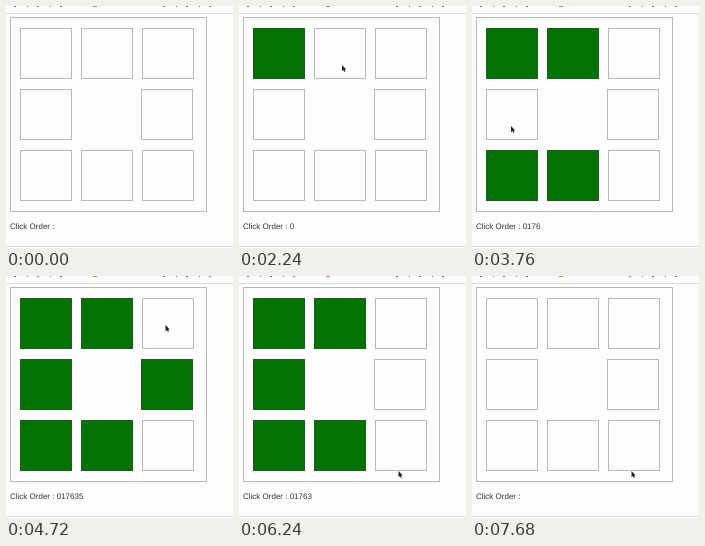
Write an HTML page that moves like this. It is 227 by 242 pixels and loops after 8000 ms.

```html
<!DOCTYPE html>
<html lang="en">
<head>
<meta charset="utf-8">
<title>Click order</title>
<style>
  html, body { margin: 0; height: 100%; overflow: hidden; background: #fdfdfd; }
  svg { display: block; width: 100vw; height: 100vh; }
  text { font: 8px "Liberation Sans", Arial, sans-serif; fill: #333; white-space: pre; text-rendering: geometricPrecision; }
  .box { fill: #fdfdfd; stroke: #b8b8b8; }
  .on { fill: #007300; stroke: #1f5c1f; }
</style>
</head>
<body>
<svg viewBox="0 0 227 242">
  <!-- bottom edge of the cropped line of text above -->
  <path d="M8 .5H60M157 .5H206" stroke="#777" stroke-dasharray="2 11 1 9"/>
  <path d="M87 .5h4" stroke="#e0708a"/>
  <path d="M0 7.5H227M0 240.5H227" stroke="#ddd"/>
  <rect class="box" x="4.5" y="11.5" width="196" height="194"/>
  <g id="grid"></g>
  <text id="label" x="4" y="223.4"></text>
  <path id="cursor" d="M0 0V6.2L1.4 5L2.4 7.1L3.4 6.6L2.5 4.6H4.3Z" fill="#222" stroke="#fff" stroke-width=".6" paint-order="stroke"/>
</svg>
<script>
const LOOP = 8000, STEP = 80;
const $ = id => document.getElementById(id);
const snap = t => Math.round(t / STEP) * STEP;

// cells in click order, and where the pointer rests for each click
const order = [..."01763528"];
const stops = [[42, 54], [103, 59], [101, 168], [40, 170], [39, 120], [160, 108], [159.5, 49], [159.5, 195]];

// clicks come evenly; then the last clicked cell clears first
const clickAt = i => snap(1970 + 480 * i);
const clearAt = i => snap(5600 + 300 * (order.length - 1 - i));

// start, duration, target
const entry = [205, 236];
const moves = [
  [880, 560, [75, 127]],
  ...stops.map((stop, i) => [i ? clickAt(i - 1) : 1600, 240, stop])
];

const boxes = order.map(cell => {
  const r = document.createElementNS("http://www.w3.org/2000/svg", "rect");
  const x = 14.5 + 61 * (cell % 3) - (cell === "5"), y = 22.5 + 61 * Math.floor(cell / 3);
  const attrs = { x, y, width: 51, height: 50 };
  for (const name in attrs) r.setAttribute(name, attrs[name]);
  return $("grid").appendChild(r);
});

const ease = p => p * p * (3 - 2 * p);

function pointer(t) {
  let [x, y] = entry;
  for (const [from, span, [tx, ty]] of moves) {
    const p = ease(Math.min(1, Math.max(0, (t - from) / span)));
    x += (tx - x) * p;
    y += (ty - y) * p;
  }
  return [x, y];
}

function draw() {
  const t = Math.floor((performance.now() - begin) % LOOP / STEP) * STEP;
  const lit = order.map((_, i) => t >= clickAt(i) && t < clearAt(i));
  boxes.forEach((box, i) => box.setAttribute("class", lit[i] ? "box on" : "box"));
  $("label").textContent = "Click Order : " + order.filter((_, i) => lit[i]).join("");
  $("cursor").setAttribute("transform", `translate(${pointer(t)})`);
  $("cursor").setAttribute("visibility", t < 720 ? "hidden" : "visible");
  requestAnimationFrame(draw);
}
const begin = performance.now();
draw();
</script>
</body>
</html>
```
